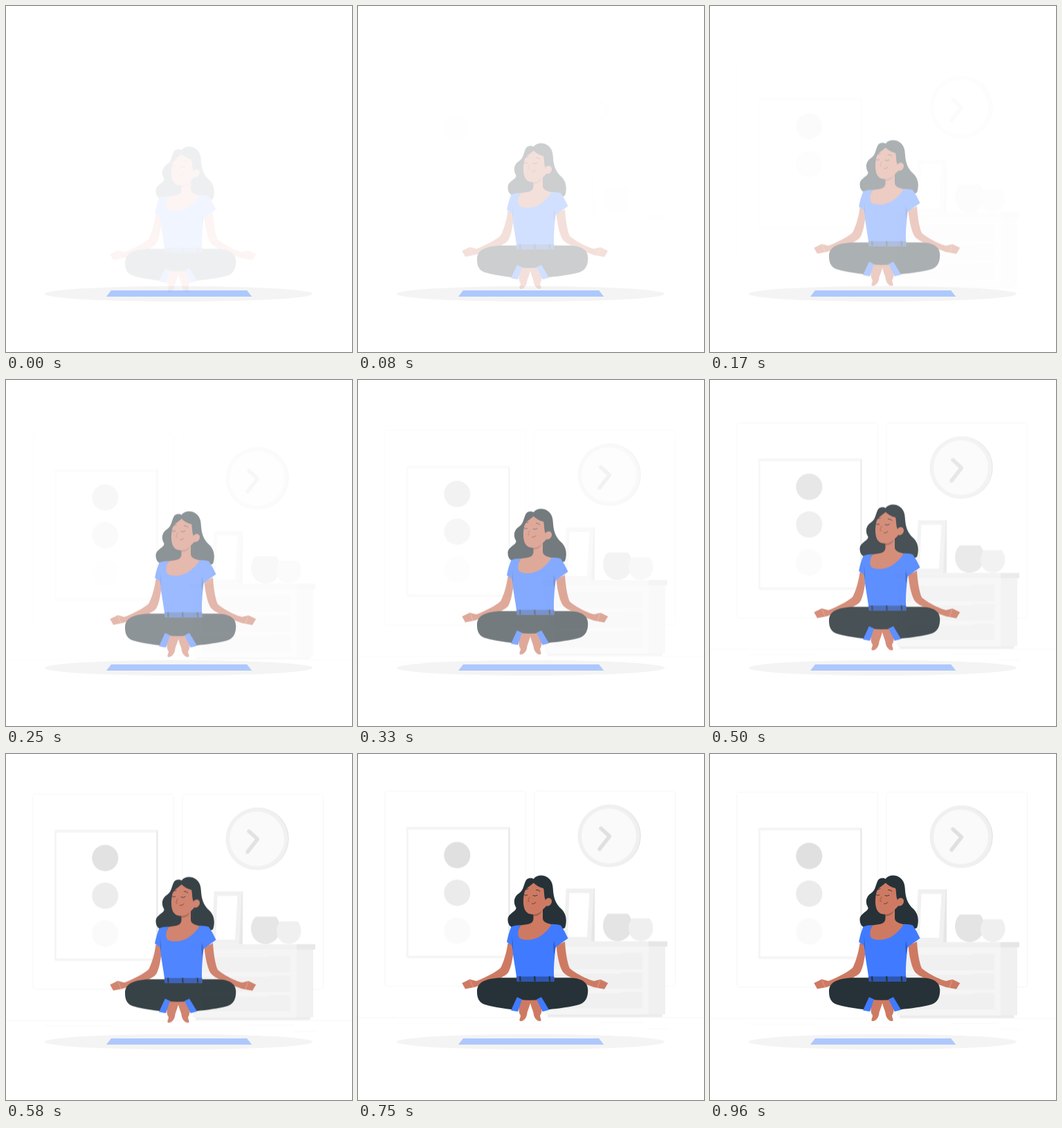
These frames come from a looping animation (500 px wide and 500 px high, 1040 ms). An HTML page:

```html
<!DOCTYPE html>
<html lang="en">
<head>
<meta charset="utf-8">
<title>Levitating meditation</title>
<style>
  html, body { margin: 0; width: 100%; height: 100%; overflow: hidden; background: #fff; }
  svg { display: block; width: 100%; height: 100%; }
  #room, #woman { opacity: 0; will-change: transform, opacity; }
  .line { fill: none; stroke-linecap: round; stroke-linejoin: round; }
  .skin { fill: #ce7a63; }
  .blue { fill: #407bff; }
  .dark { fill: #263238; }
</style>
</head>
<body>
<svg viewBox="0 0 500 500">
  <g id="room">
    <g fill="#ebebeb">
      <rect y="382.2" width="500" height=".4"/>
      <rect x="417" y="398.4" width="32" height=".3"/>
      <rect x="350" y="389.1" width="66" height=".3"/>
      <rect x="57" y="390.8" width="97" height=".25"/>
      <rect x="233" y="395" width="34" height=".25"/>
    </g>
    <g fill="none" stroke="#f3f3f3" stroke-width=".7">
      <rect x="38.7" y="55.4" width="203.8" height="282" rx="4"/>
      <rect x="255" y="55.4" width="203.6" height="282" rx="4"/>
    </g>

    <!-- poster -->
    <rect x="72" y="107.5" width="147.5" height="188.8" fill="#e6e6e6"/>
    <rect x="69.8" y="107.5" width="147.8" height="188.8" fill="#f5f5f5"/>
    <rect x="72.8" y="111" width="144" height="182" fill="#fff"/>
    <circle cx="143.3" cy="147.7" r="19" fill="#e0e0e0"/>
    <circle cx="143.3" cy="202.2" r="19" fill="#ebebeb"/>
    <circle cx="143.3" cy="257" r="19" fill="#fafafa"/>

    <!-- clock -->
    <circle cx="363.9" cy="120" r="44.9" fill="#e6e6e6"/>
    <circle cx="362.5" cy="120.2" r="44.9" fill="#f0f0f0"/>
    <circle cx="362.5" cy="120.2" r="39.6" fill="#fafafa"/>
    <path class="line" d="M351 109L363.5 120.5L349 139" stroke="#e0e0e0" stroke-width="5.4"/>

    <!-- dresser -->
    <path d="M274 376H439.5V381.8H274Z" fill="#ebebeb"/>
    <path d="M270 279H420V378.5H270Z" fill="#f5f5f5"/>
    <path d="M420 279H444V378H420Z" fill="#f0f0f0"/>
    <path d="M266 272.2H420V279.8H266Z" fill="#f0f0f0"/>
    <path d="M420 272.2H447V279.8H420Z" fill="#e6e6e6"/>
    <g id="drawers" fill="#f0f0f0"></g>

    <!-- picture stand -->
    <path d="M338 196H342.2L342 272.2H335Z" fill="#e6e6e6"/>
    <path d="M300.8 196H341L337 272.2H297Z" fill="#f0f0f0"/>
    <path d="M305.5 202.6H334.5L331 266H303Z" fill="#fff"/>

    <!-- vases -->
    <path d="M361 232.6H390C400 242 398.5 267 380 271.4Q375 272.4 370 271.4C351.500 267 350 242 361 232.600Z" fill="#e4e4e4"/>
    <path d="M396.500 239.300H421C429.500 247 429 268 412 271.600Q408.500 272.300 405 271.600C388.500 268 388 247 396.500 239.300Z" fill="#efefef"/>
  </g>

  <ellipse cx="249.600" cy="416" rx="193.600" ry="11.200" fill="#f4f4f4"/>
  <path d="M152 411H348.300L355.200 420H145Z" fill="#adc8fd"/>

  <g id="woman">
    <!-- hair behind the body -->
    <path class="dark" d="M254 180.500C250 178 244 179 242.500 183C239 190 239 197 233 201C225 206 224 215 228.500 222C229 228 216.500 230 216.500 239.500C216.500 247 221 250.500 227 253H292C299 253 299.500 251 300.300 246C302 236 299 229 294 224C285 216 282.500 207 281.800 195C281.500 173 259 172 254 180.500Z"/>

    <!-- arms -->
    <path id="armL" class="skin" d="M216.500 273C214.500 289 209.500 303 206 309C200 315 183 323.500 171 328L161.500 325.500L150.300 331L155 339.500L168 337C190 330.500 211.500 323 217 316C221.500 308 224 294 225.500 277Z"/>
    <path class="skin" d="M286.500 277C288 294 292 310.500 297 316C304 323 328 332.500 341 337L356 339.800L361.300 331L350.500 325.800L341 328C328 324.500 311 314.500 306 309.500C302 301 300 285 299 271Z"/>
    <path class="line" d="M162 327L166 336.500M350 327L346 337.500" stroke="#e3a997" stroke-width=".8"/>

    <!-- feet -->
    <path id="foot" class="skin" d="M234.500 354H250C249 364 244.500 371 244.200 376C243.500 381 239.500 386.500 234.500 386C231.500 384.500 235.500 381 234.800 377.500C231 373 232.500 364 234.500 354Z"/>
    <use href="#foot" transform="matrix(-1 0 0 1 498 0)"/>

    <!-- trousers -->
    <path class="dark" d="M206 323.200C183 324.500 172 330 172 343.500C172 355 176.500 360.500 186 362.800C198 366 213 368.200 223 369.300L232 354.500Q249 357 264 354.500L275 369.300C290 367.500 308 365.500 318 362.500C329 359.500 332.300 352 332.300 341C332 328.500 322 324 306 323.200Z"/>
    <path class="blue" d="M229.800 351.300L237 354.500L231 372.200L221 370.500Z M258 354.500L265 351.300L276.200 369.700L266.800 372.200Z"/>

    <!-- neck and shirt -->
    <path class="skin" d="M253.500 224H267V237C267 243 273 244.500 281 246.500L270 272H232L229 258L235 247.500C244 245.500 253.500 247 253.500 237Z"/>
    <path d="M253.500 231.500Q261 231.500 266 226Q263 234 254 234.500Z" fill="#a5604f"/>
    <path class="blue" d="M221.500 249.500Q227 247 235.300 247.200C231 253 230 262 233.500 266C242 271 256 268 263 263.500C270 259 276 253 280 245.800Q288 245.800 293 247.500Q299 256 303.500 266.300L285.500 279.300C284 296 282 308 283.500 328.500H229.800C228 310 224 295 222.800 277L215 271.500Q217.500 259 221.500 249.500Z"/>
    <path d="M222 263Q223.500 272 222.800 277L224 284Q224.800 272 222 263Z M283 270L285.500 279.300L283.200 290Q281.500 279 283 270Z" fill="#2f60cc"/>
    <path d="M229 321.600H283.300L284 328.300H229.500Z" fill="#2d56b3"/>
    <path class="dark" d="M233 321.200H235.200L235.600 328.500H233.500Z M254 321.200H256.300L256.800 328.500H254.600Z M275.500 321.200H277.700L278.300 328.500H276.200Z"/>

    <!-- face -->
    <path class="skin" d="M253.800 186.300C248 191.500 241.500 194 240 202C238.300 211 238.500 221 242 226.500C246 233 256 233 261 228.500C266 226 270 222.500 272 219.500C277 220.500 280.500 216 280 212C279.500 207 273 206.500 271 211C268.500 206 269.500 199 268 194C262 192.500 257.500 190 253.800 186.300Z"/>
    <g class="line" stroke="#263238" stroke-width=".9">
      <path d="M240.300 203.500Q242.300 205 244.800 203.800M253 204.500Q256 206.300 259 204M242.500 195.800L246 194.800M257.500 196.300Q261 195.800 263 198.500"/>
      <path d="M251.500 216.500Q255 217 257 214.300" stroke="#6d2f2a"/>
      <path d="M248 206.500L245.500 212.500L247.800 213.300" stroke="#a0503f"/>
    </g>
  </g>
</svg>
<script>
  const LOOP = 1040, FPS = 24, LAST = 23, RISE = 30;
  const byId = id => document.getElementById(id);

  byId("drawers").innerHTML = [289.3, 317.5, 345.700].map(y =>
    `<path d="M283 ${y + 2}H378L382 ${y}H411V${y + 23.500}H283Z"/>`).join("");

  const curve = (a, b, s) => 3 * a * s * (1 - s) ** 2 + 3 * b * s * s * (1 - s) + s ** 3;

  function bezier(x1, y1, x2, y2) {
    return x => {
      if (x <= 0) return 0;
      if (x >= 1) return 1;
      let lo = 0, hi = 1;
      for (let i = 0; i < 24; i++) {
        const mid = (lo + hi) / 2;
        if (curve(x1, x2, mid) < x) lo = mid; else hi = mid;
      }
      return curve(y1, y2, lo);
    };
  }

  // lead: how far the entrance has already run when the loop begins
  const parts = [
    { el: byId("room"), span: 1000, lead: 21, ease: bezier(.36, -.01, .5, 1.38) },
    { el: byId("woman"), span: 800, lead: 38, ease: bezier(0, 0, .58, 1) }
  ];

  // 24 pictures a second, each held on a 10 ms grid
  function heldTime(t) {
    const tick = Math.floor(t / 10);
    const step = Math.ceil((tick + .5) * FPS / 100) - 1;
    return Math.min(step, LAST) * 1000 / FPS;
  }

  function draw() {
    const t = heldTime(performance.now() % LOOP);
    for (const { el, span, lead, ease } of parts) {
      const p = ease((t + lead) / span);
      el.style.opacity = Math.max(0, Math.min(1, p));
      el.style.transform = `translateY(${(RISE * (1 - p)).toFixed(3)}px)`;
    }
    requestAnimationFrame(draw);
  }
  draw();
</script>
</body>
</html>
```
